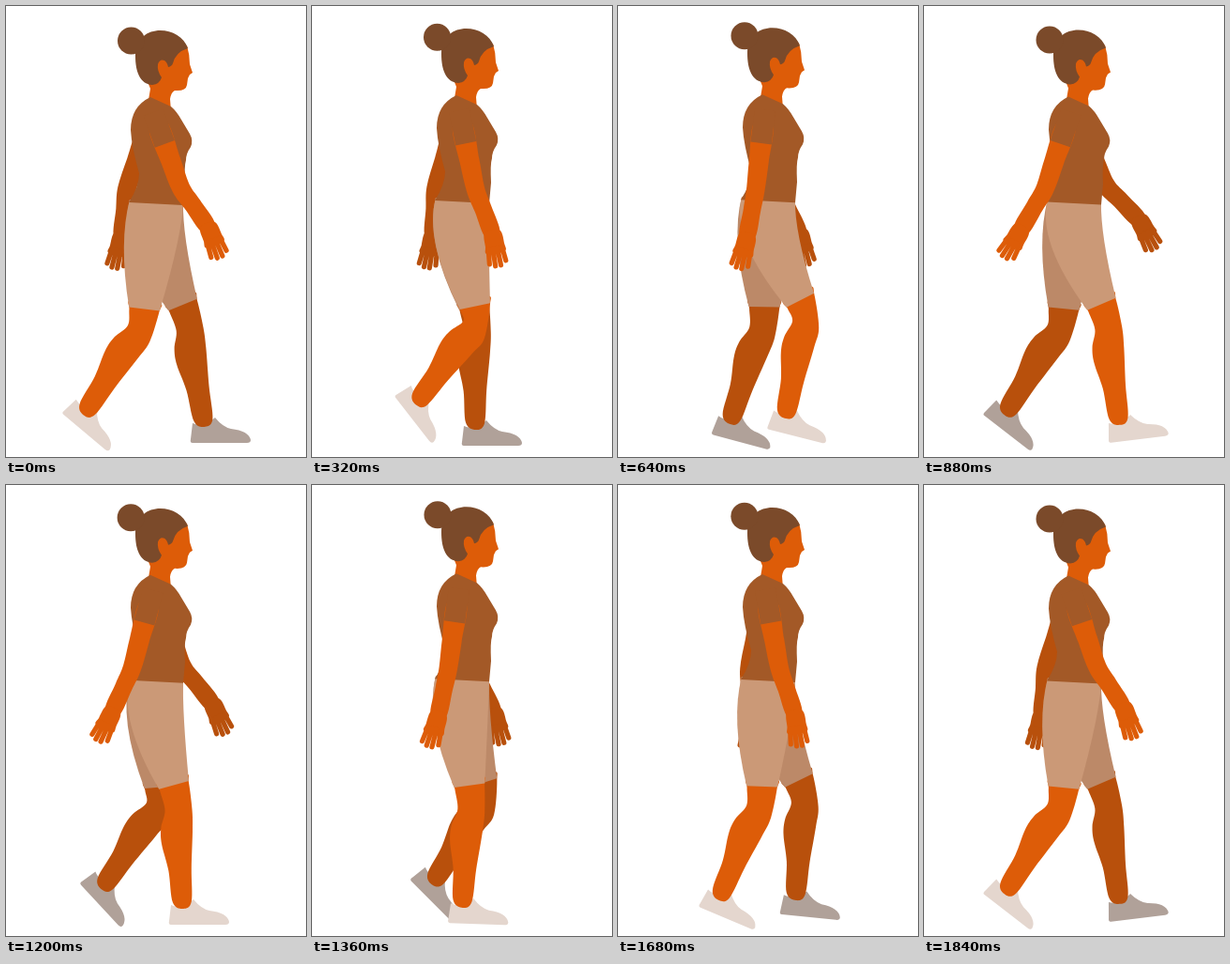
These frames come from a looping animation (320x480 px, 1.92 s). An HTML page with a canvas:

```html
<!DOCTYPE html>
<html lang="en">
<head>
<meta charset="utf-8">
<title>Walk cycle</title>
<style>
html, body { margin: 0; width: 100%; height: 100%; overflow: hidden; background: #fff; }
canvas { display: block; }
</style>
</head>
<body>
<canvas id="stage" width="320" height="480"></canvas>
<script>
const ctx = document.getElementById('stage').getContext('2d');
const LOOP = 1920, HALF = LOOP / 2, STEP = 80, RAD = Math.PI / 180;

const near = { skin: '#dd5c08', shorts: '#cb9977', shoe: '#e4d6ce' };
const far = { skin: '#b8500c', shorts: '#bc8968', shoe: '#b0a199' };
const SHIRT = '#a35927', HAIR = '#7b4a2a';

// time, thigh angle, ankle x, ankle y, foot angle
const legKeys = [
  [0, -5.3, 85, 432, 40], [240, 4, 104, 427, 47], [320, 9.5, 113, 421, 52],
  [560, 21.5, 166, 427, 26], [640, 21.5, 179, 435, 14], [880, 18.5, 208, 442, -7],
  [960, 18, 211, 444, 0], [1200, 12.5, 188, 447, 0], [1280, 9, 174, 447, 0],
  [1520, 1, 133, 443, 8], [1600, -0.5, 120, 441, 15], [1840, -4.5, 88, 432, 37.5]
];
// time, forearm angle
const nearArmKeys = [[0, 35], [320, 21], [640, -10], [880, -30], [1200, -24], [1520, 3.5], [1840, 33]];
const farArmKeys = [[0, -6], [320, -3.5], [640, 26], [880, 44], [1200, 39], [1520, 12], [1840, -5]];

const shirt = new Path2D('M154 97L176 107Q182 112 187 121L196 136Q200 143 197 150Q192 157 192 164Q190 170 191 190L189 212L131 209Q142 192 142 178Q134 150 133 132Q133 107 154 97Z');
const skinHead = new Path2D('M150 78L154 88L152 100L176 112L175 99Q176 92 180 90Q192 91 193 84L194 77L196 73L199 71L196 62Q196 52 193 42L160 45Z');
const hair = new Path2D('M194 45C186 20 138 17 138 53C138 70 143 83 156 84Q164 83 166 76Q161 69 162 62Q164 56 169 58Q172 60 173 65Q177 64 178 61Q181 49 194 45Z');
const shoe = new Path2D('M-12 0Q0 5 12 -6Q20 4 29 6Q48 8 50 18Q50 21 46 21L-12 21Q-15 21 -14 17Z');

// Smooth periodic interpolation of all values of a key list
function track(keys, time) {
  const n = keys.length, t = (time % LOOP + LOOP) % LOOP;
  const i = keys.findLastIndex(k => k[0] <= t);
  const [a, b, c, d] = [-1, 0, 1, 2].map(j => {
    const k = keys[(i + j + n) % n];
    return [k[0] + Math.floor((i + j) / n) * LOOP, ...k.slice(1)];
  });
  const span = c[0] - b[0], s = (t - b[0]) / span, r = 1 - s;
  return b.slice(1).map((v, j) => {
    const w = c[j + 1];
    const m0 = (w - a[j + 1]) / (c[0] - a[0]) * span;
    const m1 = (d[j + 1] - v) / (d[0] - b[0]) * span;
    return r * r * (1 + 2 * s) * v + s * s * (3 - 2 * s) * w + s * r * (r * m0 - s * m1);
  });
}

// Limb coordinates: u points forward, v runs down the limb
function frame(x, y, deg) {
  const s = Math.sin(deg * RAD), c = Math.cos(deg * RAD);
  return (u, v) => [x + u * c + v * s, y - u * s + v * c];
}

function fill(color, path) {
  ctx.fillStyle = color;
  path ? ctx.fill(path) : ctx.fill();
}

function polygon(color, pts) {
  ctx.beginPath();
  pts.forEach(p => ctx.lineTo(...p));
  fill(color);
}

function blob(color, pts) {
  const n = pts.length, at = i => pts[(i + n) % n];
  ctx.beginPath();
  ctx.moveTo(...pts[0]);
  for (let i = 0; i < n; i++) {
    const [a, b, c, d] = [at(i - 1), at(i), at(i + 1), at(i + 2)];
    ctx.bezierCurveTo(b[0] + (c[0] - a[0]) / 6, b[1] + (c[1] - a[1]) / 6,
      c[0] - (d[0] - b[0]) / 6, c[1] - (d[1] - b[1]) / 6, ...c);
  }
  fill(color);
}

function drawLeg(time, bob, colors) {
  const [thigh, ax, ay, foot] = track(legKeys, time);
  const upper = frame(157, 221 + bob, thigh);
  const [kx, ky] = upper(0, 121);
  const len = Math.hypot(ax - kx, ay - ky);
  const shin = frame(kx, ky, Math.atan2(ax - kx, ay - ky) / RAD);
  const hem = frame(...upper(0, 102), thigh * 1.25);

  ctx.save();
  ctx.translate(ax, ay);
  ctx.rotate(foot * RAD);
  ctx.translate(-foot / 9, -foot / 11);
  fill(colors.shoe, shoe);
  ctx.restore();

  blob(colors.skin, [
    hem(-15.5, -8), hem(15.5, -8), hem(16, 2), shin(15, len * .08), shin(14.5, len * .28),
    shin(11.5, len * .65), shin(10, len * .97), shin(1, len + 4), shin(-10, len * .97),
    shin(-13, len * .66), shin(-19, len * .4), shin(-19, len * .24), shin(-14, len * .07), hem(-16, 2)
  ]);

  ctx.beginPath();
  ctx.moveTo(132, 206 + bob);
  ctx.lineTo(189, 209 + bob);
  ctx.quadraticCurveTo(188, 243 + bob, ...hem(16.5, 0));
  ctx.lineTo(...hem(-16.5, 0));
  ctx.quadraticCurveTo(120, 251 + bob, 132, 206 + bob);
  fill(colors.shorts);
}

function drawArm(x, y, upperDeg, foreDeg, handDeg, skin) {
  const upper = frame(x, y, upperDeg);
  const elbow = upper(0, 86);
  const fore = frame(...elbow, foreDeg);
  const joint = frame(...elbow, (upperDeg + foreDeg) / 2);
  const hand = frame(...fore(0, 52), handDeg);

  blob(skin, [
    upper(-10, 15), upper(10, 15), upper(10.5, 55), joint(10, 0), fore(9.5, 22), fore(8, 52),
    fore(-8, 52), fore(-9, 22), joint(-9.5, 0), upper(-10.5, 55)
  ]);
  blob(skin, [hand(-8, -4), hand(8, -4), hand(10.5, 11), hand(9.5, 19), hand(-9.5, 19), hand(-10, 11)]);

  ctx.strokeStyle = skin;
  ctx.lineWidth = 5.2;
  ctx.lineCap = 'round';
  ctx.beginPath();
  [[-8, 30], [-2.7, 33], [2.7, 33], [8.2, 29]].forEach(([u, v]) => {
    ctx.moveTo(...hand(u * .9, 14));
    ctx.lineTo(...hand(u * 1.1, v));
  });
  ctx.stroke();
  polygon(SHIRT, [upper(-11, 0), upper(11, 0), upper(11.3, 36), upper(-11.3, 36)]);
}

function draw(time) {
  const wave = shift => Math.cos((time - shift) / HALF * 2 * Math.PI);
  const bob = 1.6 * (wave(40) - 1);
  const [b] = track(nearArmKeys, time), [f] = track(farArmKeys, time);

  ctx.clearRect(0, 0, 320, 480);
  drawArm(158, 114 + bob, .9 * f - 14.6, f, .8 * f - 8, far.skin);
  drawLeg(time + HALF, bob, far);
  drawLeg(time, bob, near);

  ctx.save();
  ctx.translate(0, bob);
  fill(near.skin, skinHead);
  fill(HAIR, hair);
  fill(SHIRT, shirt);
  ctx.restore();

  ctx.beginPath();
  ctx.arc(134 + wave(640), 37 + bob * 1.9, 14.5, 0, 7);
  fill(HAIR);
  drawArm(157, 113 + bob, .6 * b - 1, b, .8 * b - 7, near.skin);
}

const start = performance.now();
function tick() {
  const time = (performance.now() - start) % LOOP;
  draw(Math.floor(time / STEP) * STEP);
  requestAnimationFrame(tick);
}
tick();
</script>
</body>
</html>
```
